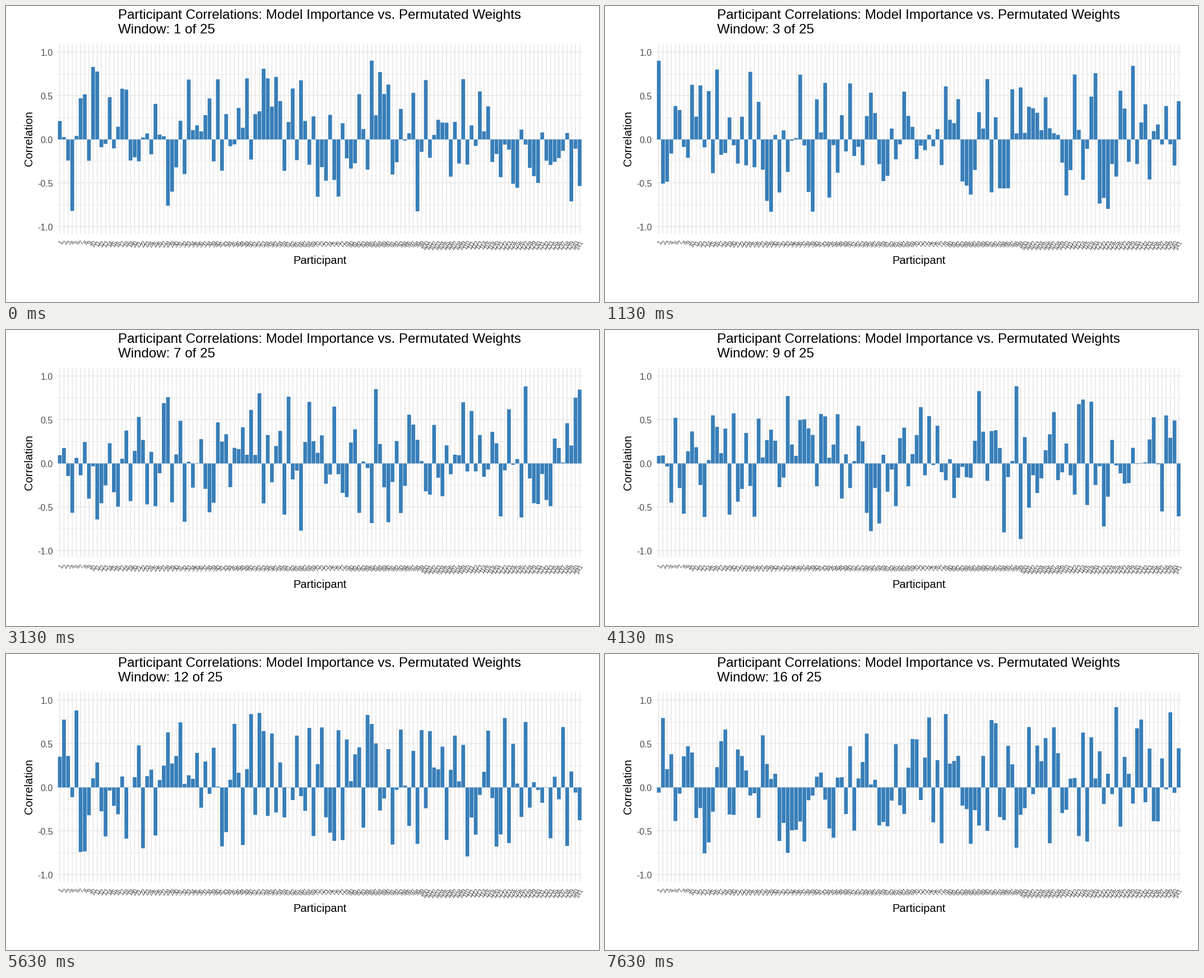
A matplotlib script for the animation above (8 s loop, 1058 px wide and 529 px high).

```python
import numpy as np
import matplotlib.pyplot as plt
from matplotlib.animation import FuncAnimation
from matplotlib.collections import PolyCollection

WIDTH, HEIGHT, DPI = 1058, 529, 64
FRAMES, INTERVAL = 64, 125
WINDOWS, TOTAL = 16, 25

LEFT, RIGHT, TOP, BOTTOM = 92, 1028, 67, 407
ZERO_Y, UNIT = 238.5, 156
FIRST_X, STEP = 96, 7.42
BAR_HALF = 0.45 * STEP
BLUE, GRID, TICK = "#377EB8", "#EBEBEB", "#4D4D4D"

ABSENT = {5, 42, 47, 55, 60, 63, 64, 71, 79, 86, 95, 115, 117, 118, 134}
participants = [p for p in range(1, 142) if p not in ABSENT]
centers = FIRST_X + STEP * np.arange(len(participants))

# Bell-shaped correlations, squeezed into -1..1
rng = np.random.default_rng(25)
data = np.tanh(rng.normal(0.03, 0.52, (WINDOWS, len(participants))))
uppers, lowers = np.maximum(data, 0), np.minimum(data, 0)

# Each window rests from its arrival to its departure, then moves linearly
arrive = [0, 4, 9, *range(13, FRAMES, 4)]
leave = [1, 6, 11, *range(15, FRAMES, 4)]
key_frames = np.ravel(np.column_stack([arrive, leave]))
key_windows = np.repeat(np.arange(WINDOWS), 2)


def to_y(value):
    return ZERO_Y - UNIT * np.asarray(value)


def boxes(x0, x1, y0, y1):
    x0, x1, y0, y1 = np.broadcast_arrays(x0, x1, y0, y1)
    corners = [(x0, y0), (x1, y0), (x1, y1), (x0, y1)]
    return np.stack([np.stack(corner, axis=-1) for corner in corners], axis=1)


fig = plt.figure(figsize=(WIDTH / DPI, HEIGHT / DPI), dpi=DPI, facecolor="white")
ax = fig.add_axes([0, 0, 1, 1])
ax.set_xlim(0, WIDTH)
ax.set_ylim(HEIGHT, 0)
ax.axis("off")


def add_boxes(verts, color):
    shapes = PolyCollection(verts, facecolors=color, edgecolors="none", linewidths=0)
    shapes.set_snap(False)
    ax.add_collection(shapes, autolim=False)
    return shapes


def label(x, y, text, size, color="black", **style):
    return ax.text(x, y, text, fontsize=size * 72 / DPI, color=color,
                   family="Liberation Sans", va="baseline",
                   rotation_mode="anchor", **style)


major_values = np.linspace(1, -1, 5)
major_y = np.floor(to_y(major_values))
minor_y = np.floor(to_y(major_values[:-1] - 0.25))
add_boxes(boxes(LEFT, RIGHT, minor_y, minor_y + 1), GRID)
add_boxes(boxes(LEFT, RIGHT, major_y - 1, major_y + 1), GRID)
add_boxes(boxes(centers - 1, centers + 1, TOP, BOTTOM), GRID)

bar_left, bar_right = centers - BAR_HALF, centers + BAR_HALF
bars = add_boxes(boxes(bar_left, bar_right, ZERO_Y, ZERO_Y), BLUE)

label(200, 23, "Participant Correlations: Model Importance vs. Permutated Weights", 24.1)
subtitle = label(200, 49, "", 24.1)
label(560.5, 461, "Participant", 20.1, ha="center")
label(47, 237, "Correlation", 20.1, ha="center", rotation=90)
for value, y in zip(major_values, major_y):
    label(84, y + 7, f"{value:.1f}", 16, TICK, ha="right")
for x, participant in zip(centers, participants):
    label(x + 6.6, 421.8, str(participant), 10.67, TICK, ha="right", rotation=60)


def draw(frame):
    position = np.interp(frame, key_frames, key_windows)
    start = int(position)
    end, part = min(start + 1, WINDOWS - 1), position - start
    upper = (1 - part) * uppers[start] + part * uppers[end]
    lower = (1 - part) * lowers[start] + part * lowers[end]
    bars.set_verts(boxes(bar_left, bar_right, to_y(upper), to_y(lower)))
    subtitle.set_text(f"Window: {int(position + 0.5) + 1} of {TOTAL}")
    return bars, subtitle


anim = FuncAnimation(fig, draw, frames=FRAMES, interval=INTERVAL,
                     repeat=True, repeat_delay=0, blit=False)
plt.show()
```
